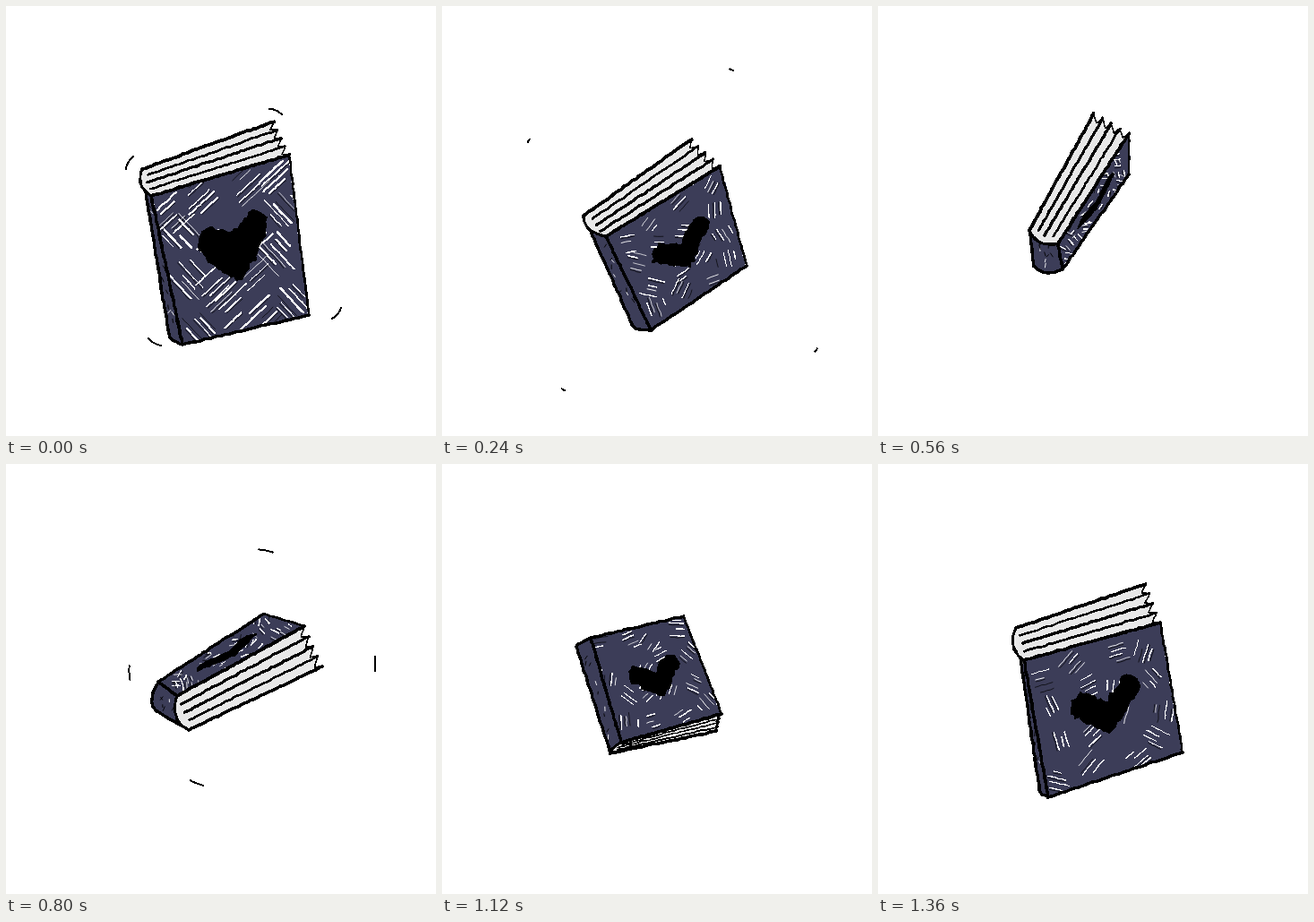
Write an HTML page that moves like this. It is 480x480 px and loops after 1440 ms.

```html
<!DOCTYPE html>
<html lang="en">
<head>
<meta charset="utf-8">
<title>Tumbling book</title>
<style>
  html, body { margin: 0; width: 100%; height: 100%; overflow: hidden; background: #fff; }
  svg { display: block; width: 100vw; height: 100vh; }
</style>
</head>
<body>
<svg id="stage" viewBox="0 0 480 480" fill="none" stroke-linecap="round" stroke-linejoin="round" shape-rendering="crispEdges"></svg>
<script>
const STEP = 80, COUNT = 18, TURN = 10;
const NAVY = '#3c3d58', PAPER = '#e8e8e8', INK = '#000';
const stage = document.getElementById('stage');

// Key poses by step: the facing cover (from the top of the spine, clockwise),
// then the far side of the spine (top, bottom). All other corners follow.
const poses = {
  0: [[162, 212], [316, 166], [338, 345], [197, 378], [152, 182], [181, 362]],
  3: [[183, 257], [310, 179], [340, 290], [233, 362], [158, 234], [212, 355]],
  5: [[203, 275], [312, 172], [317, 233], [212, 333], [172, 251], [186, 320]],
  7: [[201, 265], [280, 142], [280, 188], [206, 294], [169, 250], [174, 290]],
  10: [[170, 243], [288, 167], [333, 181], [191, 259], [168, 276], [204, 297]],
  14: [[166, 194], [270, 170], [312, 279], [200, 311], [150, 204], [188, 323]],
  17: [[163, 219], [315, 177], [340, 322], [190, 372], [154, 183], [180, 362]]
};

// Dashes flying away from a centre
const bursts = [
  { at: 0, mid: [244, 238], grow: .39, bend: 3,
    from: [[301, 118], [138, 175], [369, 343], [166, 375]] },
  { at: TURN, mid: [263, 227], grow: .3, bend: 1,
    from: [[290, 97], [138, 233], [412, 223], [213, 356]] }
];

let seed = 1;
const rnd = () => {
  seed = (seed * 16807) % 2147483647;
  return seed / 2147483647;
};
const wob = a => (rnd() * 2 - 1) * a;
const mix = (a, b, t) => a + (b - a) * t;
const mixPt = (p, q, t) => [mix(p[0], q[0], t), mix(p[1], q[1], t)];
const dist = (p, q) => Math.hypot(q[0] - p[0], q[1] - p[1]);
const shift = (p, d, k) => [p[0] + d[0] * k, p[1] + d[1] * k];
const unit = (p, q) => {
  const l = dist(p, q) || 1;
  return [(q[0] - p[0]) / l, (q[1] - p[1]) / l];
};
const area = q => q.reduce((s, p, i) => {
  const n = q[(i + 1) % q.length];
  return s + p[0] * n[1] - n[0] * p[1];
}, 0) / 2;
const onQuad = (q, u, v) => mixPt(mixPt(q[0], q[1], u), mixPt(q[3], q[2], u), v);

const toPath = pts => 'M' + pts.map(p => p[0].toFixed(1) + ' ' + p[1].toFixed(1)).join('L');
const line = (pts, w, color = INK) =>
  `<path d="${toPath(pts)}" stroke="${color}" stroke-width="${w.toFixed(2)}"/>`;
const fill = (pts, color) => `<path d="${toPath(pts)}Z" fill="${color}"/>`;

// Hand-drawn version of a polyline
function rough(pts, amp = .6) {
  const out = [pts[0]];
  for (let i = 1; i < pts.length; i++) {
    const n = Math.max(1, Math.round(dist(pts[i - 1], pts[i]) / 4));
    for (let k = 1; k <= n; k++) {
      const p = mixPt(pts[i - 1], pts[i], k / n);
      out.push([p[0] + wob(amp), p[1] + wob(amp)]);
    }
  }
  return out;
}

const curve = (a, c, b) =>
  [0, .2, .4, .6, .8, 1].map(t => mixPt(mixPt(a, c, t), mixPt(c, b, t), t));

// Short edge of the spine, rounded away from the pages
const bulge = (a, b, dir) =>
  curve(a, shift(mixPt(a, b, .5), dir, -.42 * dist(a, b)), b);

// A patch of parallel scratches
function hatch(mid, deg, len, n, ink) {
  let out = '';
  const r = deg * Math.PI / 180, d = [Math.cos(r), Math.sin(r)], side = [-d[1], d[0]];
  for (let i = 0; i < n; i++) {
    const c = shift(shift(mid, side, (i - (n - 1) / 2) * 6 + wob(1.5)), d, wob(len * .25));
    const half = len * mix(.2, .55, rnd());
    const a = shift(c, d, -half), b = shift(c, d, half);
    if (rnd() < .5) out += line(rough([shift(a, side, 2), shift(b, side, 2)], .5), .7);
    if (rnd() < .85) out += line(rough([a, b], .4), mix(.7, .8 + 1.7 * ink, rnd()), '#fff');
  }
  return out;
}

function heart(q, ink, thick) {
  const dip = mix(.56, .38, ink), top = mix(.35, .28, ink);
  const half = [[0, dip], [.1, mix(top, dip, .4)], [.17, top], [.24, top + .04],
    [.26, top + .11], [.13, .57], [0, .68]];
  const right = half.map(([x, v]) => [.52 + x, v]);
  const left = half.map(([x, v]) => [.52 - x, v + x * .15]).reverse();
  const pts = rough([...right, ...left].map(p => onQuad(q, ...p)), 2 * thick);
  return `<path d="${toPath(pts)}Z" fill="${INK}" stroke="${INK}" stroke-width="${1 + 1.5 * thick}"/>`;
}

function cover(q, ink, id) {
  const s = area(q), size = Math.min(1, Math.sqrt(s / 27000));
  const thick = Math.min(1, s / dist(q[0], q[1]) / 80);
  let marks = '';
  for (let i = 0; i < 16; i++) {
    const u = (i % 4 + .5) / 4, v = (Math.floor(i / 4) + .5) / 4;
    const deg = Math.abs(u - .5) > .25 && v > .3 ? 47 : -43;
    marks += hatch(onQuad(q, u + wob(.06), v + wob(.06)), deg + wob(100 * (1 - ink)),
      size * mix(8, 38, ink), Math.round(mix(2, 6, ink)), ink);
  }
  return fill(rough([...q, q[0]], 1.6), NAVY) +
    `<clipPath id="${id}"><path d="${toPath(q)}Z"/></clipPath><g clip-path="url(#${id})">${marks}</g>` +
    heart(q, ink, thick) +
    q.map((p, i) => line(rough([p, q[(i + 1) % 4]]), i === 1 ? 2.6 : 3.4)).join('');
}

function spine(q, dir) {
  const [a, b, c, d] = q;
  const top = bulge(a, b, dir), end = bulge(c, d, dir);
  let out = fill([...top, ...end], NAVY);
  for (let i = 0; i < 9; i++) {
    const p = onQuad(q, mix(.25, .75, rnd()), mix(.12, .88, rnd()));
    out += line([p, [p[0] + wob(3), p[1] + 2 + rnd() * 3]], .9, i % 3 ? INK : '#fff');
  }
  return out + [[b, c], end, [d, a], top].map(e => line(rough(e), 3.4)).join('');
}

// q: spine and far corner of one cover, then far and spine corner of the other
function pages(q, dir) {
  const [a, b, c, d] = q, sheets = 4, depth = Math.min(8, dist(b, c) * .18);
  const near = bulge(a, d, dir), far = [b];
  for (let k = 1; k <= sheets; k++) {
    far.push(shift(mixPt(b, c, (k - .25) / sheets), dir, -depth));
    far.push(mixPt(b, c, k / sheets));
  }
  const w = Math.min(2.9, dist(b, c) / 12);
  let out = fill([...near.slice().reverse(), ...far], PAPER);
  for (let k = 1; k < sheets; k++) {
    const from = shift(mixPt(a, d, k / sheets), dir, rnd() * 5);
    out += line(rough([from, far[2 * k]]), w * mix(.85, 1.2, rnd()));
  }
  return out + line(rough(far, .4), 1.6) + line(rough(near, .4), 2.8) +
    line(rough([a, b]), 3.8) + line(rough([d, c]), 3.6);
}

// Eight corners: front cover, then back cover; the leaves fan out at the far side
function corners(at) {
  const [tl, tr, br, bl, top, end] = poses[at];
  const across = (far, near, other, fan) =>
    [far[0] + other[0] - near[0] + fan, far[1] + other[1] - near[1] + fan];
  const box = [tl, tr, br, bl, top, across(tr, tl, top, -7), across(br, bl, end, 7), end];
  return at < TURN ? box : box.reverse();
}

function boxAt(n) {
  const keys = Object.keys(poses).map(Number);
  const i = Math.max(1, keys.findIndex(k => k >= n));
  const [from, to] = [keys[i - 1], keys[i]], next = corners(to);
  return corners(from).map((p, k) => mixPt(p, next[k], (n - from) / (to - from)));
}

function book(n) {
  const box = boxAt(n), pick = ids => ids.map(i => box[i]);
  const ink = Math.max(.5, 1 - n * .16), dir = unit(box[0], box[1]);
  const faces = [
    [[0, 1, 2, 3], q => cover(q, ink, 'front')],
    [[7, 6, 5, 4], q => cover(q, ink, 'back')],
    [[4, 0, 3, 7], q => spine(q, dir)],
    [[4, 5, 1, 0], q => pages(q, dir)],
    [[3, 2, 6, 7], q => pages(q, dir)]
  ];
  return faces.map(([ids, paint]) => {
    const q = pick(ids);
    return area(q) > 60 ? paint(q) : '';
  }).join('');
}

function dashes(n) {
  let out = '';
  for (const { at, mid, grow, bend, from } of bursts) {
    const t = (n - at) / 3;
    if (t < 0 || t > 1) continue;
    for (const p of from) {
      const c = mixPt(mid, p, 1 + grow * t), away = unit(mid, p);
      const side = [-away[1], away[0]], half = mix(8, 2, t);
      out += line(curve(shift(c, side, -half), shift(c, away, bend * (1 - t)), shift(c, side, half)), 2);
    }
  }
  return out;
}

function draw(n) {
  seed = 7919 * (n + 3);
  stage.innerHTML = book(n) + dashes(n);
}

let shown = -1;
const start = performance.now();
function tick(now) {
  const n = Math.floor(Math.max(0, now - start) / STEP) % COUNT;
  if (n !== shown) draw(shown = n);
  requestAnimationFrame(tick);
}
draw(shown = 0);
requestAnimationFrame(tick);
</script>
</body>
</html>
```
